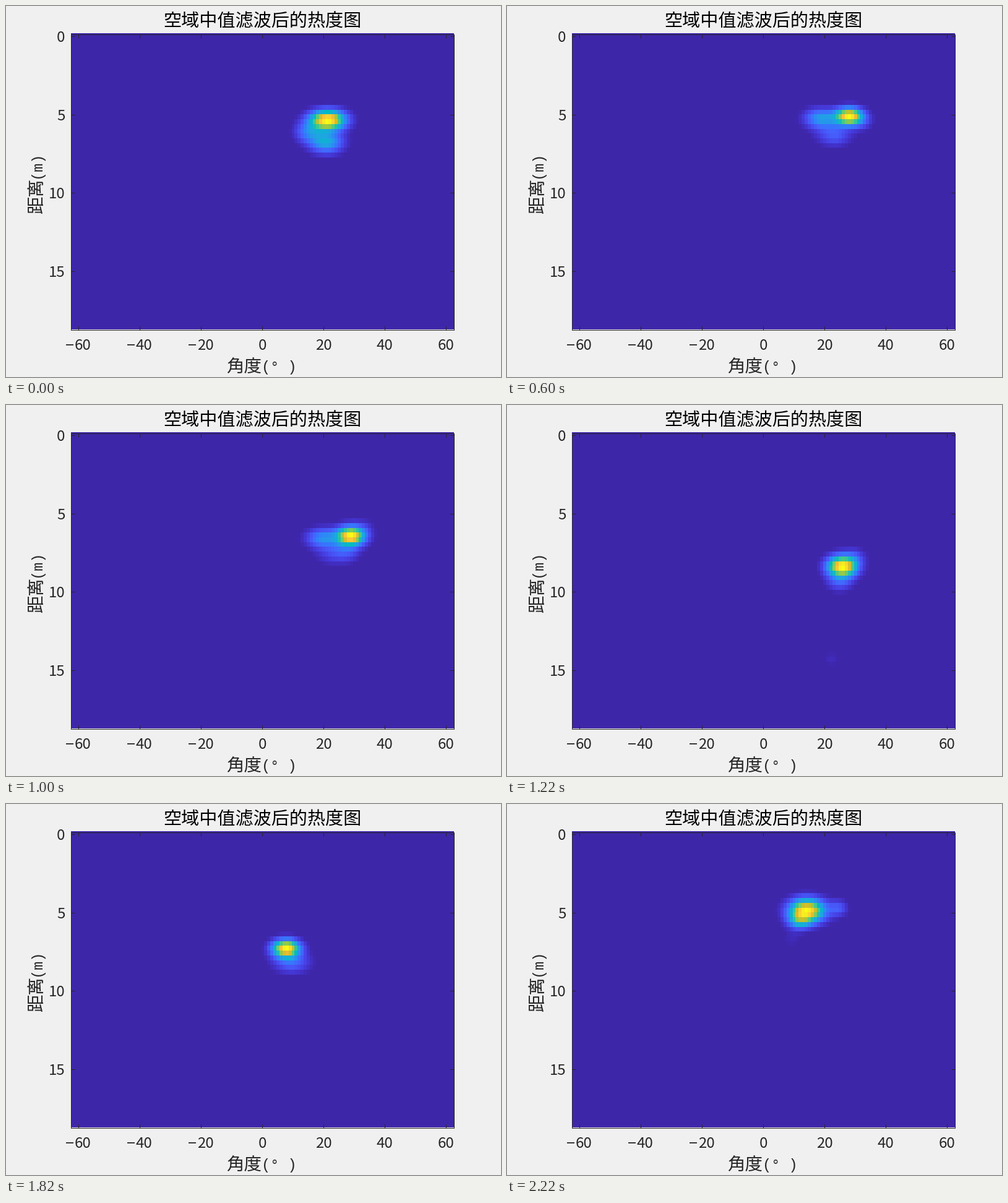
These frames come from a looping animation (800 px wide and 600 px high, 2240 ms). A matplotlib script:

```python
import numpy as np
import matplotlib.pyplot as plt
from matplotlib.animation import FuncAnimation
from matplotlib.colors import LinearSegmentedColormap

W, H, DPI = 800, 600, 100
FRAMES, STEP = 112, 20
LEFT, RIGHT, TOP, BOTTOM = 104.5, 723.5, 45.5, 523.5
COLS, ROWS, CELL_M = 125, 62, 0.3045
INK = "#262626"
CJK, MONO = "Noto Sans CJK JP", "Liberation Mono"

PARULA = LinearSegmentedColormap.from_list("parula", [
    "#3E26A8", "#4332CB", "#4741E5", "#4852F4", "#4563FD", "#3875FE",
    "#2E87F7", "#2797EB", "#20A5E3", "#12B1D6", "#02BAC3", "#24C1AE",
    "#37C897", "#57CC7A", "#81CC59", "#ABC739", "#D1BF27", "#F0BA36",
    "#FEC338", "#FAD62D", "#F5E924", "#F9FB15"], N=256)

# Path of the strongest echo: time in ms, angle in degrees, range in metres
PATH = np.array([
    (0, 21.3, 5.38), (200, 22.5, 5.2), (400, 24.4, 5.05), (540, 26, 5.1),
    (760, 33, 5.25), (920, 30, 5.9), (1090, 27.5, 7.1), (1220, 25.7, 8.4),
    (1390, 22.3, 8.9), (1560, 17.2, 8.8), (1640, 14, 8.4),
    (1820, 7.7, 7.32), (2020, 8.8, 6.1), (2220, 14.2, 4.9)])

# Echo shapes: time, then lobes (angle offset, range offset, widths, strength)
SHAPES = [
    (0, [(0, 0, 3.8, .42, 1), (-.5, 1.4, 3.6, .48, .42),
         (-6.2, .75, 3, .45, .25)]),
    (400, [(0, 0, 3.1, .37, 1), (4.3, .4, 2.4, .36, .2),
           (-4.6, 1.45, 3, .36, .12)]),
    (760, [(0, 0, 3, .36, .85), (-9.2, .12, 3.5, .42, .56),
           (-5, 1.05, 4, .5, .25)]),
    (1220, [(0, 0, 3.2, .45, 1), (-.9, 1, 2.8, .4, .16),
            (4.3, -.6, 2.5, .4, .1)]),
    (1560, [(0, 0, 3.3, .42, 1), (-3.5, .55, 2.6, .4, .28),
            (6.3, 0, 2, .35, .14), (.6, 1.6, 3, .4, .11)]),
    (1820, [(0, 0, 3, .38, 1), (1.8, .9, 4, .45, .22)]),
    (2220, [(0, 0, 3.9, .5, 1), (-2.5, .65, 2.6, .36, .35),
            (10.2, -.15, 2, .35, .18), (-4.9, 1.8, 2.5, .4, .045)]),
]
GHOST_TIME, GHOST_SPAN = 1220, 70

angle, dist = np.meshgrid(np.arange(COLS) - COLS // 2,
                          np.arange(ROWS) * CELL_M)


def lobe(a, r, sa, sr, amp):
    return amp * np.exp(-((angle - a) / sa) ** 2 / 2
                        - ((dist - r) / sr) ** 2 / 2)


def echo(lobes, a0, r0):
    heat = sum(lobe(a0 + a, r0 + r, *rest) for a, r, *rest in lobes)
    return heat / heat.max()


def heatmap(t):
    a0 = np.interp(t, PATH[:, 0], PATH[:, 1])
    r0 = np.interp(t, PATH[:, 0], PATH[:, 2])
    times = [s[0] for s in SHAPES]
    pos = np.interp(t, times, range(len(times)))
    i = min(int(pos), len(SHAPES) - 2)
    mix = pos - i
    heat = ((1 - mix) * echo(SHAPES[i][1], a0, r0)
            + mix * echo(SHAPES[i + 1][1], a0, r0))
    heat /= heat.max()
    fade = max(0, 1 - abs(t - GHOST_TIME) / GHOST_SPAN)
    heat += lobe(22.2, 14.3, 1.8, .35, .05 * fade)
    return np.clip((heat - .02) / .98, 0, 1)


def label(x, y, text, px, color=INK, font=CJK, **kw):
    kw = {"ha": "center", "va": "baseline", **kw}
    ax.text(x, y, text, fontsize=px * 72 / DPI, color=color, family=font, **kw)


def stroke(xs, ys, px=1):
    ax.plot(xs, ys, color=INK, lw=px * 72 / DPI, solid_capstyle="butt")


fig = plt.figure(figsize=(W / DPI, H / DPI), dpi=DPI, facecolor="#F0F0F0")
ax = fig.add_axes([0, 0, 1, 1])
ax.axis("off")
image = ax.imshow(heatmap(0), cmap=PARULA, vmin=0, vmax=1, aspect="auto",
                  interpolation="nearest",
                  extent=(LEFT, RIGHT, BOTTOM, TOP - .5))
ax.set(xlim=(0, W), ylim=(H, 0))

stroke([LEFT, RIGHT, RIGHT, LEFT, LEFT], [TOP, TOP, BOTTOM, BOTTOM, TOP])

for deg in range(-60, 61, 20):
    x = 414 + deg * (RIGHT - LEFT) / COLS
    stroke([x, x], [BOTTOM, BOTTOM - 6])
    stroke([x, x], [TOP, TOP + 6])
    if deg < 0:
        stroke([x - 19.5, x - 8], [548, 548], 1.8)
    label(x + (7 if deg < 0 else 0), 556, str(abs(deg)), 24)

for metres in range(0, 16, 5):
    y = 48.9 + metres * 25.34
    stroke([LEFT, LEFT + 6], [y, y])
    stroke([RIGHT, RIGHT - 6], [y, y])
    label(95.5, y + 9, str(metres), 24, ha="right")

label(414, 33, "空域中值滤波后的热度图", 29.1, "black")
label(356, 593, "角度", 28.5, ha="left")
label(413, 591, "(° )", 23.6, font=MONO, ha="left")
turned = {"rotation": 90, "rotation_mode": "anchor", "ha": "left"}
label(58, 335.5, "距离", 28.5, **turned)
label(56, 278.5, "(m)", 23.6, font=MONO, **turned)


def update(frame):
    image.set_data(heatmap(frame * STEP))
    return [image]


anim = FuncAnimation(fig, update, frames=FRAMES, interval=STEP,
                     repeat=True, repeat_delay=0, blit=False)
plt.show()
```
